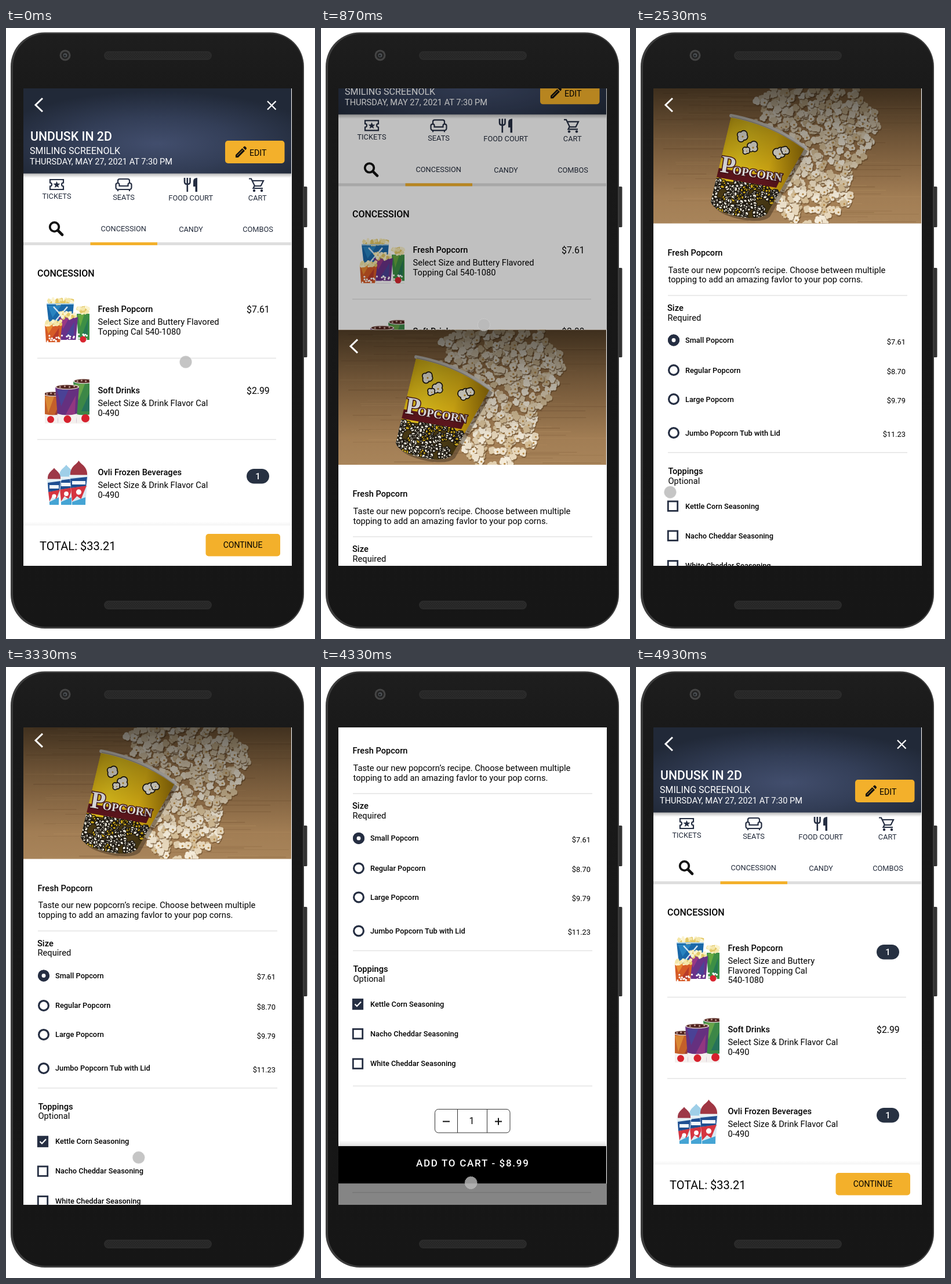
An HTML page for the animation above (5590 ms loop, 533 px wide and 1052 px high).

```html
<!DOCTYPE html>
<html lang="en">
<head>
<meta charset="utf-8">
<title>Concession order</title>
<style>
html, body { margin: 0; width: 100%; height: 100%; overflow: hidden; background: #fff; }
svg { display: block; width: 100vw; height: 100vh; }
text { font-family: Roboto, Arial, sans-serif; white-space: pre; }
</style>
</head>
<body>
<svg id="stage" viewBox="0 0 533 1052"></svg>
<script>
const LOOP = 5590, VIEW = 822, SCROLL = 206;
const NAVY = '#252e42', GOLD = '#f3b02b', LINE = '#e4e4e4';

// ---- markup helpers ----
const text = (x, y, size, str, { fill = '#000', weight = 400, anchor = 'start', extra = '' } = {}) =>
  `<text x="${x}" y="${y}" font-size="${size}" fill="${fill}" font-weight="${weight}" text-anchor="${anchor}" ${extra}>${str}</text>`;
const bold = (x, y, size, str, o = {}) => text(x, y, size, str, { weight: 500, ...o });
const rect = (x, y, w, h, fill, extra = '') =>
  `<rect x="${x}" y="${y}" width="${w}" height="${h}" fill="${fill}" ${extra}/>`;
const circle = (x, y, r, fill, extra = '') => `<circle cx="${x}" cy="${y}" r="${r}" fill="${fill}" ${extra}/>`;
const path = (d, fill, extra = '') => `<path d="${d}" fill="${fill}" ${extra}/>`;
const stroke = (d, color, width, extra = '') =>
  path(d, 'none', `stroke="${color}" stroke-width="${width}" ${extra}`);
const rule = (x, y, w) => rect(x, y - .75, w, 1.5, LINE);
const repeat = (n, fn) => Array.from({ length: n }, (_, i) => fn(i)).join('');

function randomizer(seed) {
  return () => {
    seed = (seed + 0x6D2B79F5) | 0;
    let v = Math.imul(seed ^ (seed >>> 15), 1 | seed);
    v = (v + Math.imul(v ^ (v >>> 7), 61 | v)) ^ v;
    return ((v ^ (v >>> 14)) >>> 0) / 4294967296;
  };
}

// A cluster of overlapping discs, one popped kernel.
function kernel(x, y, r, rnd) {
  const turn = rnd() * 6.28;
  return repeat(4, i => {
    const a = turn + i * 1.7, q = r * (.5 + rnd() * .3);
    const cx = x + Math.cos(a) * r * .6, cy = y + Math.sin(a) * r * .6;
    return `M${(cx - q).toFixed(1)} ${cy.toFixed(1)}a${q.toFixed(1)} ${q.toFixed(1)} 0 1 0 ${(2 * q).toFixed(1)} 0a${q.toFixed(1)} ${q.toFixed(1)} 0 1 0 ${(-2 * q).toFixed(1)} 0`;
  });
}

// ---- phone ----
const phone = () => {
  const grille = y => rect(169, y, 186, 15, '#2b2b2b', 'rx="7.5"') +
    rect(171, y + 2, 182, 11, 'url(#dots)', 'rx="5.5"');
  return rect(511, 273, 8.5, 70, '#333', 'rx="1.5"') + rect(511, 413, 8.5, 154, '#333', 'rx="1.5"') +
    rect(8, 7.5, 506, 1026.5, '#3c3c3c', 'rx="59"') +
    rect(12, 10, 500, 1021, 'url(#body)', 'rx="56"') +
    circle(102, 47, 9.5, '#454545') + circle(102, 47, 6.5, '#232323') +
    circle(102, 47, 3.5, '#4c5054') + circle(101.5, 47.5, 1.8, '#202326') +
    grille(40) + grille(986);
};

// ---- menu artwork ----
const cup = (x1, x2, y1, x3, x4, y2, fill) => path(`M${x1} ${y1}H${x2}L${x4} ${y2}H${x3}Z`, fill);
const facets = (x, y, w, h, a, b) =>
  path(`M${x} ${y}L${x + w * .55} ${y}L${x + w * .2} ${y + h * .6}Z`, a, 'opacity=".7"') +
  path(`M${x + w * .9} ${y + h * .2}L${x + w * .85} ${y + h}L${x + w * .35} ${y + h}Z`, b, 'opacity=".7"');
function heap(x, y, w, h, seed) {
  const rnd = randomizer(seed);
  return repeat(Math.round(w * h / 7), () => path(kernel(x + rnd() * w, y + rnd() * h, 2.5, rnd), ['#f4e6a8', '#e3c866', '#fbf3cf'][rnd() * 3 | 0]));
}
const speckle = (x, y, w, seed) => {
  const rnd = randomizer(seed);
  return repeat(12, () => circle(x + rnd() * w, y + rnd() * 11, 1.6, '#fff'));
};
const popcornArt = () =>
  cup(70, 117, 474, 75, 113, 520, '#1a68a8') + facets(72, 478, 42, 34, '#2f8fca', '#0e4a83') +
  stroke('M82 480L106 506M106 480L84 506', '#d6e6f2', 2.5) + heap(72, 467, 43, 7, 3) +
  stroke('M70 475H117', '#a9cfe6', 2) +
  cup(122, 144, 492, 125, 144, 541, '#3d8f45') + facets(124, 493, 20, 36, '#79b43f', '#1d6f5a') + heap(123, 481, 20, 10, 5) +
  cup(91, 124, 498, 95, 120, 541, '#6a3289') + facets(93, 500, 28, 30, '#ad3a82', '#3f4a9b') + heap(93, 490, 28, 9, 7) +
  cup(67, 97, 510, 69, 93, 541, '#d65b27') + facets(68, 511, 26, 26, '#ef9c36', '#a92e2c') + heap(69, 504, 26, 7, 9) +
  speckle(70, 529, 22, 4) + speckle(96, 529, 22, 6) + speckle(123, 527, 20, 8) +
  rect(95, 537, 49, 4, '#fff') + circle(133, 536, 5.5, '#d9252f');
const drinkArt = () => {
  const drink = (x1, x2, y, x3, x4, fill, a, b) =>
    cup(x1, x2, y, x3, x4, 681, fill) + facets(x1 + 3, y + 5, x2 - x1 - 5, 47, a, b) +
    path(`M${x3 - 1.5} 664Q${(x1 + x2) / 2} 669 ${x4 + 1.5} 664L${x4} 681H${x3}Z`, '#f4f0ee') +
    `<ellipse cx="${(x1 + x2) / 2}" cy="${y}" rx="${(x2 - x1) / 2}" ry="4.5" fill="#e9e0dc"/>` +
    `<ellipse cx="${(x1 + x2) / 2}" cy="${y}" rx="${(x2 - x1) / 2 - 2}" ry="3.2" fill="#51241f"/>` +
    repeat(4, i => circle(x1 + (x2 - x1) * (i + 1) / 5, y - (i % 2), 1.6, '#c3a097'));
  return `<g clip-path="url(#drinkBox)">` +
    drink(116, 152, 608, 120, 148, '#3c8747', '#7ab04b', '#1d6a62') +
    drink(64, 98, 630, 66, 94, '#c4602a', '#e29a3a', '#8f2d37') +
    drink(85, 126, 618, 90, 121, '#65307f', '#3f4aa0', '#a43a80') +
    circle(77, 674, 6, '#d6212d') + circle(106, 673.5, 6.5, '#d6212d') + circle(137, 672, 7, '#d6212d') + '</g>';
};
const frozenArt = () => {
  const frozen = (x, w, y, dome) => {
    const m = x + w / 2;
    return path(`M${x + 1} ${y}C${x} ${y - w * .55} ${m - 4} ${y - w * .6} ${m} ${y - w * .85}C${m + 4} ${y - w * .6} ${x + w} ${y - w * .55} ${x + w - 1} ${y}Z`, dome) +
      cup(x, x + w, y, x + 4, x + w - 4, 821, '#d9eaf3') +
      path(`M${x + 1} ${y + 5}L${x + w - 1} ${y + 2}L${x + w - 3} ${y + 18}L${x + 2} ${y + 21}Z`, '#1f4f92') +
      path(`M${x + 2} ${y + 21}L${x + w - 2} ${y + 17}L${m + 4} 811L${m - 3} 806L${x + 4} 815Z`, '#d63540') +
      path(`M${x + 4} 816L${x + w - 4} 808V821H${x + 4}Z`, '#45a4d4') +
      circle(m, y + 28, w * .15, '#fff') + rect(x + 4, y + 9, w - 8, 6, '#f3f7fa') +
      rect(x - 1, y - 1.5, w + 2, 3, '#eef3f6', 'rx="1"');
  };
  return frozen(91, 26, 774, '#9fcfe8') + frozen(71, 24, 778, '#9d3847') + frozen(110, 31, 771, '#a03643');
};

// ---- menu screen ----
const icons = () =>
  stroke('M76 261H99V266.5A3 3 0 0 0 99 272.5V278H76V272.5A3 3 0 0 0 76 266.5Z', NAVY, 2.2) +
  path('M87.5 263.8L89.1 267.8L93.4 268.1L90.1 270.8L91.2 275L87.5 272.7L83.8 275L84.9 270.8L81.6 268.1L85.9 267.8Z', NAVY) +
  stroke('M193 267V263Q193 260 196 260H210Q213 260 213 263V267M193 267Q189.5 267 189.5 270V274Q189.5 278 193 278H213Q216.5 278 216.5 274V270Q216.5 267 213 267Q210.500 267 210.500 270V272H195.500V270Q195.500 267 193 267M193 278V281M213 278V281', NAVY, 2.2) +
  stroke('M308 258V265Q308 269 312.800 269T317.500 265V258M312.800 258V282', NAVY, 2.6) +
  path('M323 264Q323 258 330 258V282H326.500V273H323Z', NAVY) +
  stroke('M419 259.500H423L429 272H439.500L444 263H425M428.500 272L426.500 276H443', NAVY, 2.2) +
  circle(428, 280, 2.2, NAVY) + circle(441, 280, 2.2, NAVY) +
  circle(83.5, 342.5, 7.8, 'none', 'stroke="#111" stroke-width="3.8"') +
  stroke('M89.500 348.500L97 356', '#111', 4.6, 'stroke-linecap="round"');

const label = (x, y, str) => text(x, y, 12.8, str, { anchor: 'middle', fill: '#222a3a' });
const badge = y => rect(415, y, 39, 25.5, '#273142', 'rx="12.75"') +
  bold(434.5, y + 18, 15, '1', { anchor: 'middle', fill: '#fff' });
const lines = (x, y, rows) => rows.map((row, i) => text(x, y + i * 16.7, 14.7, row)).join('');
const product = (y, name, rows) => bold(158.5, y, 14.6, name) + lines(158.5, y + 22, rows);
const price = (y, str) => text(415, y, 15.8, str);

const menu = () =>
  rect(30, 104, 463, VIEW, '#fff') +
  rect(30, 250, 462, 8, 'url(#headShade)') + rect(30, 104, 462, 146.5, 'url(#head)') +
  stroke('M63 121L51 132.500L63 144', '#fff', 3) +
  stroke('M451 126L465.500 140.500M465.500 126L451 140.500', '#fff', 2.3) +
  bold(42, 194, 21.3, 'UNDUSK IN 2D', { fill: '#fff' }) +
  text(41, 217, 16, 'SMILING SCREENOLK', { fill: '#fff' }) +
  text(41, 235, 14.6, 'THURSDAY, MAY 27, 2021 AT 7:30 PM', { fill: '#fff' }) +
  rect(378, 194, 102.5, 39, GOLD, 'rx="5"') +
  path('M396 223V218.500L407.500 207L412 211.500L400.500 223ZM408.700 205.800L410.800 203.900Q411.700 203.200 412.600 204L414.800 206.300Q415.400 207.200 414.700 208L413.200 210.300Z', '#111') +
  stroke('M398.500 220L408.500 210', GOLD, 1) +
  text(420, 220, 14.2, 'EDIT') + icons() +
  label(87.5, 293.5, 'TICKETS') + label(203, 296, 'SEATS') + label(318.7, 297, 'FOOD COURT') + label(433.7, 297, 'CART') +
  label(202.7, 349.5, 'CONCESSION') + label(319, 350.5, 'CANDY') + label(434.5, 350.5, 'COMBOS') +
  rect(30, 369, 462, 5, '#dedede') + rect(145.5, 369, 115.5, 5, GOLD) +
  bold(54, 428, 16, 'CONCESSION') +
  popcornArt() + drinkArt() + frozenArt() +
  `<g id="unordered">${product(489, 'Fresh Popcorn', ['Select Size and Buttery Flavored', 'Topping Cal 540-1080'])}${price(489.5, '$7.61')}</g>` +
  `<g id="ordered">${product(489, 'Fresh Popcorn', ['Select Size and Buttery', 'Flavored Topping Cal', '540-1080'])}${badge(478)}</g>` +
  rule(54, 568.5, 412) +
  product(629, 'Soft Drinks', ['Select Size &amp; Drink Flavor Cal', '0-490']) + price(629.5, '$2.99') +
  rule(54, 708.5, 412) +
  product(770, 'Ovli Frozen Beverages', ['Select Size &amp; Drink Flavor Cal', '0-490']) + badge(759) +
  rect(30, 850, 462, 7, 'url(#footShade)') + rect(30, 856.5, 463, 70, '#fff') +
  text(58, 899, 20, 'TOTAL: $33.21') +
  rect(344.5, 871, 128.5, 38.5, GOLD, 'rx="5"') + text(408.5, 895, 14, 'CONTINUE', { anchor: 'middle' });

// ---- sheet photo ----
function spilledPopcorn() {
  const rnd = randomizer(21);
  const inside = (x, y, cx, cy, rx, ry) => ((x - cx) / rx) ** 2 + ((y - cy) / ry) ** 2 < .8 + rnd() * .35;
  const tones = ['#efe3cd', '#e2d0b0', '#f5ecda', '#d8c19a', '#e9d9bd'];
  return repeat(760, () => {
    const x = 185 + rnd() * 240, y = 104 + rnd() * 234;
    if (!inside(x, y, 302, 168, 112, 86) && !inside(x, y, 298, 270, 76, 70)) return '';
    const d = kernel(x, y, 5.2, rnd);
    return path(d, '#6f4f2c', 'transform="translate(1.2 2)" opacity=".6"') + path(d, tones[rnd() * 5 | 0]) +
      (rnd() < .45 ? circle(x + 1, y + 1, 1.7, '#b98d4c') : '');
  });
}
function bucket() {
  const rnd = randomizer(5);
  const outline = 'stroke="#1c1710" stroke-width="1.5"';
  const shape = 'M164 152Q232 164 291 207L226 320Q214 331 178 325Q134 316 129 299Z';
  const toon = (x, y, r) => {
    const d = kernel(x, y, r, rnd);
    return path(d, '#1c1710', 'stroke="#1c1710" stroke-width="3.5"') + path(d, '#fbf7ea') + circle(x + 1, y + 1, r * .22, '#d0a23c');
  };
  const serif = 'style="font-family:\'Liberation Serif\',serif;font-weight:700" stroke="#4a151b" stroke-width="3" paint-order="stroke"';
  return path(shape, '#2a1c10', 'transform="translate(5 5)" opacity=".4"') +
    `<clipPath id="bucketClip"><path d="${shape}"/></clipPath><g clip-path="url(#bucketClip)">` +
    path(shape, 'url(#tub)') +
    path('M128 262Q180 262 250 284L222 340H120Z', '#4a3a14') +
    repeat(105, () => {
      const x = 125 + rnd() * 122, y = 260 + rnd() * 68 + (x - 130) * .12;
      return path(kernel(x, y, 5.4, rnd), rnd() < .2 ? '#e2b91c' : '#f2eee0', outline);
    }) +
    path('M138 240L249 260L242 275L134 256Z', '#64171f') +
    `<g transform="rotate(9 147 248)">` +
    text(144, 248, 42, 'P', { fill: '#fff', extra: serif }) +
    text(166, 248, 20, 'OPCORN', { fill: '#fff', extra: serif }) + '</g>' +
    path(shape, 'url(#tubShade)') + '</g>' +
    toon(183, 186, 7) + toon(201, 205, 7.5) + toon(190, 211, 5) + toon(247, 216, 8) + toon(257, 211, 5) +
    stroke('M164 151Q234 164 292 206', '#d9d4cc', 6, 'stroke-linecap="round"') +
    stroke('M165 153Q233 166 291 208', '#a59c90', 1.2);
}
function photo() {
  const rnd = randomizer(11);
  const grain = repeat(90, () => {
    const x = 30 + rnd() * 380, y = 105 + rnd() * 230;
    return rect(x.toFixed(1), y.toFixed(1), (50 + rnd() * 130).toFixed(1), (.6 + rnd()).toFixed(1), rnd() < .5 ? '#6b4a2a' : '#c09a6a', 'opacity=".28"');
  });
  return `<g clip-path="url(#photoBox)">` + rect(30, 104, 463, 233, 'url(#wood)') + grain +
    spilledPopcorn() + bucket() + rect(30, 104, 463, 233, 'url(#photoShade)') + '</g>';
}

// ---- item sheet ----
const choice = (y, name, cost) =>
  circle(65, y, 8.4, '#fff', `stroke="${NAVY}" stroke-width="3.2"`) + bold(85, y + 4.5, 12.8, name) +
  text(465, y + 7, 12.8, cost, { anchor: 'end' });
const topping = (y, name) =>
  rect(55.3, y - 8, 16.4, 16.4, '#fff', `stroke="${NAVY}" stroke-width="2.8"`) + bold(85, y + 4.5, 12.8, name);

const sheet = () =>
  rect(30, 104, 463, 1028, '#fff') + photo() + stroke('M63 121L51 132.500L63 144', '#fff', 3) +
  bold(54.5, 392, 14.6, 'Fresh Popcorn') +
  lines(55.5, 421.5, ['Taste our new popcorn’s recipe. Choose between multiple', 'topping to add an amazing favlor to your pop corns.']) +
  rule(55, 460.5, 413) + bold(54, 487, 14.7, 'Size') + text(54.5, 503.5, 14.7, 'Required') +
  choice(537.5, 'Small Popcorn', '$7.61') + choice(589, 'Regular Popcorn', '$8.70') +
  choice(639, 'Large Popcorn', '$9.79') + choice(697, 'Jumbo Popcorn Tub with Lid', '$11.23') +
  circle(65, 537.5, 6.7, 'none', `id="radioMark" stroke="${NAVY}" stroke-width="6.6"`) +
  rule(55, 731, 413) + bold(55.5, 768, 14.7, 'Toppings') + text(55.5, 784.5, 14.7, 'Optional') +
  topping(823, 'Kettle Corn Seasoning') + topping(874, 'Nacho Cheddar Seasoning') + topping(925.5, 'White Cheddar Seasoning') +
  `<g id="checkMark">${rect(54, 813.5, 19, 19, NAVY)}${stroke('M58.500 823L62 826.500L69 819', '#fff', 2.2)}</g>` +
  rule(55, 964, 413) +
  rect(196.5, 1004, 129.5, 40.5, '#fff', 'rx="6" stroke="#333" stroke-width="1"') +
  stroke('M235.500 1004V1044.500M286.500 1004V1044.500', '#333', 1) +
  stroke('M210 1025H222M300 1025H312M306 1019V1031', '#111', 2) +
  text(260, 1030, 16, '1', { anchor: 'middle' }) +
  rect(30, 1057, 462, 11, 'url(#barShade)') + rect(30, 1067.5, 462, 64.5, '#000') +
  bold(164, 1102.5, 17, 'ADD TO CART - $8.99', { fill: '#fff', extra: 'letter-spacing="1.7"' });

// ---- definitions ----
const fade = (id, stops, dir = 'x2="0" y2="1"') => `<linearGradient id="${id}" ${dir}>` +
  stops.map(([o, c, a = 1]) => `<stop offset="${o}" stop-color="${c}" stop-opacity="${a}"/>`).join('') + '</linearGradient>';
const clip = (id, x, y, w, h) => `<clipPath id="${id}">${rect(x, y, w, h, '#000')}</clipPath>`;
const defs = () => '<defs>' +
  clip('screen', 30, 104, 463, VIEW) + clip('photoBox', 30, 104, 462, 232.5) + clip('drinkBox', 67, 603, 77, 78) +
  '<pattern id="dots" width="4" height="4" patternUnits="userSpaceOnUse"><circle cx="1" cy="1" r=".8" fill="#1d1d1d"/><circle cx="3" cy="3" r=".8" fill="#1d1d1d"/></pattern>' +
  '<radialGradient id="head" cx=".5" cy=".65" r=".62"><stop offset="0" stop-color="#424e6d"/><stop offset=".5" stop-color="#333e57"/><stop offset="1" stop-color="#212938"/></radialGradient>' +
  fade('body', [[0, '#1e1e1e'], [.1, '#191919'], [1, '#161616']]) +
  fade('headShade', [[0, '#000', .3], [1, '#000', 0]]) +
  fade('footShade', [[0, '#000', 0], [1, '#000', .05]]) +
  fade('barShade', [[0, '#000', 0], [1, '#000', .13]]) +
  fade('wood', [[0, '#9a7449'], [.5, '#a37c51'], [1, '#a8845a']]) +
  fade('photoShade', [[0, '#000', .6], [.35, '#000', .32], [.8, '#000', .03], [1, '#000', 0]]) +
  fade('tub', [[0, '#e9b90f'], [.4, '#f9d51f'], [1, '#dfa80c']], 'x2="1" y2=".3"') +
  fade('tubShade', [[0, '#000', .18], [.25, '#000', 0], [.7, '#000', 0], [1, '#000', .3]], 'x2="1" y2=".3"') + '</defs>';

const stage = document.getElementById('stage');
stage.innerHTML = defs() + phone() +
  `<g clip-path="url(#screen)"><g id="menu">${menu()}</g>${rect(30, 104, 463, VIEW, '#000', 'id="dim"')}<g id="sheet">${sheet()}</g></g>` +
  circle(0, 0, 10.5, '#b8b8b8', 'id="pointer" fill-opacity=".82" stroke="#dcdcdc" stroke-opacity=".8" stroke-width="1" stroke-dasharray="1.5 1.5"');
const part = Object.fromEntries([...stage.querySelectorAll('g[id], circle[id], rect[id]')].map(node => [node.id, node]));

// ---- motion ----
const pointerPath = [
  [0, 310, 575], [40, 310, 575], [270, 285, 499], [570, 285, 499], [870, 281, 511], [1130, 266, 590],
  [1400, 150, 575], [1600, 72, 528], [1730, 64, 523], [1800, 64, 520], [2060, 88, 640], [2330, 59, 769],
  [2530, 59, 799], [2640, 72, 816], [2800, 64, 814], [2930, 64, 813], [3130, 225, 845], [3240, 225, 845],
  [3800, 279, 839], [4080, 262, 890], [4250, 260, 890], [4530, 255, 880], [4870, 250, 1020], [LOOP, 250, 1020]
];
const clamp = v => Math.min(1, Math.max(0, v));
const glide = (t, from, to) => {
  const u = clamp((t - from) / (to - from));
  return u < .5 ? 4 * u ** 3 : 1 - 4 * (1 - u) ** 3;
};

// Monotone cubic through the pointer stops, so it never overshoots them.
function along(t, axis) {
  const slope = i => (pointerPath[i + 1][axis] - pointerPath[i][axis]) / (pointerPath[i + 1][0] - pointerPath[i][0]);
  const tangent = i => {
    if (i === 0 || i === pointerPath.length - 1) return 0;
    const a = slope(i - 1), b = slope(i);
    return a * b > 0 ? 2 * a * b / (a + b) : 0;
  };
  const i = Math.max(0, pointerPath.findIndex(stop => stop[0] > t) - 1);
  const [a, b] = [pointerPath[i], pointerPath[i + 1]];
  const h = b[0] - a[0], u = (t - a[0]) / h, v = 1 - u;
  return a[axis] * v * v * (1 + 2 * u) + b[axis] * u * u * (3 - 2 * u) +
    h * (tangent(i) * u * v * v - tangent(i + 1) * u * u * v);
}

const show = (node, on) => node.setAttribute('visibility', on ? 'visible' : 'hidden');
const shift = (node, x, y) => node.setAttribute('transform', `translate(${x.toFixed(2)} ${y.toFixed(2)})`);

function draw(t) {
  const enter = glide(t, 592, 1152), leave = glide(t, 4206, 4766);
  const ordered = t > 2000;
  const cover = ordered ? 1 - leave : enter;
  const scroll = SCROLL * glide(t, 3225, 3770);
  shift(part.menu, 0, (ordered ? 1 : -1) * cover * VIEW / 4);
  shift(part.sheet, 0, VIEW * (1 - enter - leave) - scroll);
  part.dim.setAttribute('opacity', (cover / 2).toFixed(3));
  show(part.unordered, !ordered);
  show(part.ordered, ordered);
  show(part.radioMark, t >= 1800);
  show(part.checkMark, t >= 2790);
  show(part.pointer, t < 4900);
  shift(part.pointer, along(t, 1), along(t, 2));
}

const start = performance.now();
function tick() {
  draw((performance.now() - start) % LOOP);
  requestAnimationFrame(tick);
}
draw(0);
requestAnimationFrame(tick);
</script>
</body>
</html>
```
